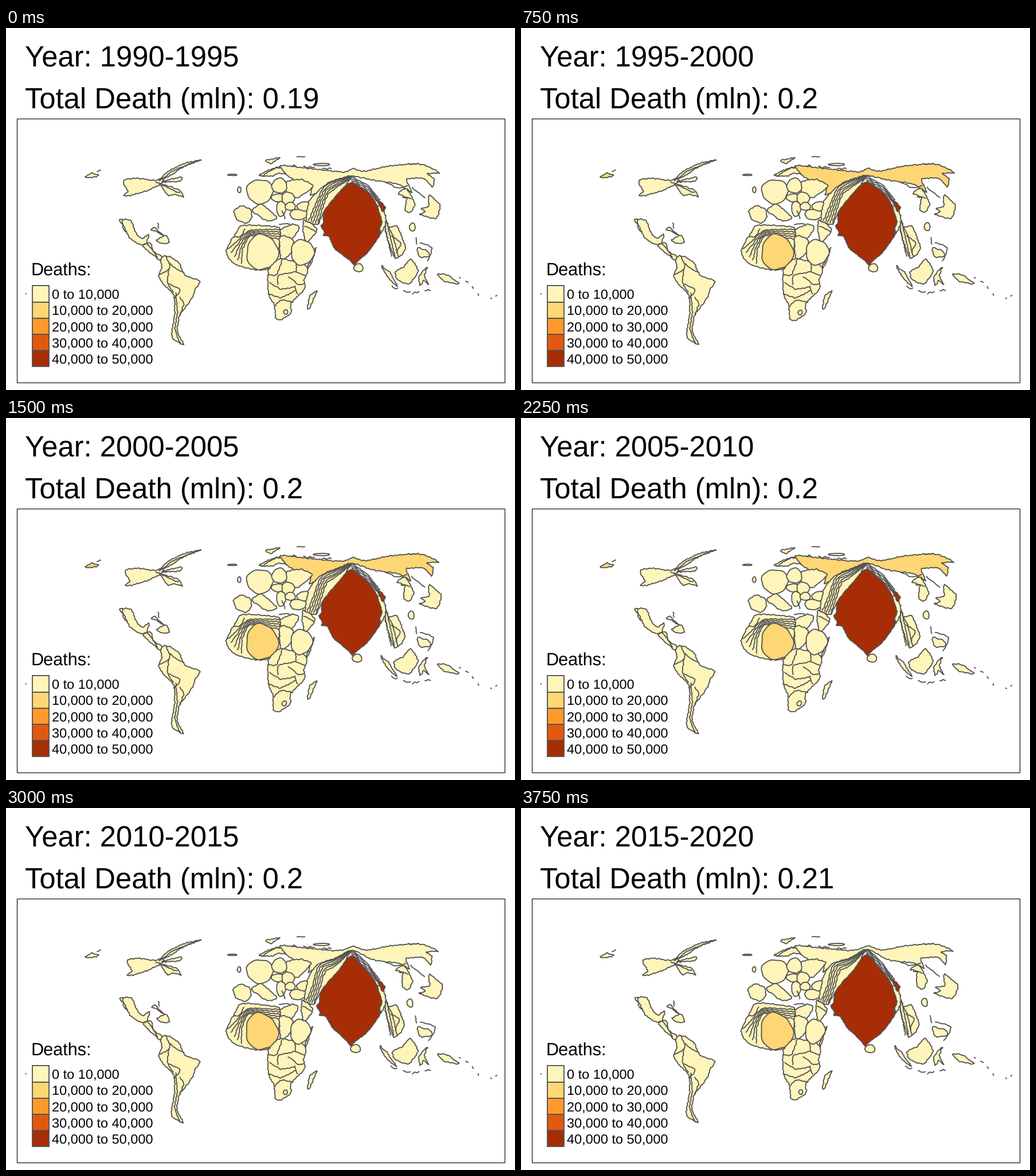
Recreate the animation shown at these times as a matplotlib script. Size 888 by 631 pixels, loop 4.5 s.

```python
import numpy as np
import matplotlib.pyplot as plt
from matplotlib.animation import FuncAnimation
from matplotlib.patches import Polygon, Rectangle

W, H, DPI = 888, 631, 100
PX = 72 / DPI
SCALE = ["#FFF5BA", "#FED674", "#FE9A2C", "#E1590F", "#A62D06"]
EDGE = "#535353"
LINE = 1.85 * PX
PACE = [0, 0.08, 0.4, 0.43, 0.85, 1]
SOUTH = [0, 0.4, 1, 1, 0.2, 0]

plt.rcParams["font.family"] = "Liberation Sans"
plt.rcParams["text.hinting"] = "none"
fig = plt.figure(figsize=(W / DPI, H / DPI), dpi=DPI, facecolor="white")
ax = fig.add_axes([0, 0, 1, 1])
ax.set_xlim(0, W)
ax.set_ylim(H, 0)
ax.axis("off")
shapes = []


def pairs(nums):
    return np.array(nums, float).reshape(-1, 2)


def coast(pts, closed, rough):
    """Run a soft curve through the points and ruffle it."""
    if closed:
        ring = np.vstack([pts[-1:], pts, pts[:2]])
    else:
        ring = np.vstack([pts[:1], pts, pts[-1:]])
    out = []
    for a, b, c, d in zip(ring, ring[1:], ring[2:], ring[3:]):
        n = max(2, int(np.hypot(*(c - b)) / 2.5))
        t = np.linspace(0, 1, n, endpoint=False)[:, None]
        m, k = 0.3 * (c - a), 0.3 * (d - b)
        out.append(b + m * t + (3 * (c - b) - 2 * m - k) * t ** 2
                   + (2 * (b - c) + m + k) * t ** 3)
    if not closed:
        out.append(pts[-1:])
    p = np.vstack(out)
    x, y = p.T
    return p + rough * np.column_stack([
        np.sin(0.8 * y + 0.3 * x) + 0.5 * np.sin(0.37 * y),
        np.sin(0.75 * x - 0.4 * y) + 0.5 * np.sin(0.41 * x)])


def add(pts, tint, **style):
    patch = Polygon(pts, ec=EDGE, lw=LINE, joinstyle="round", **style)
    ax.add_patch(patch)
    shapes.append((patch, pts, tint))


def area(*nums, tint=(0,) * 6, rough=0.7):
    add(coast(pairs(nums), True, rough), tint, fc=SCALE[0])


def blob(x, y, rx, ry, tint=(0,) * 6):
    a = np.linspace(0, 2 * np.pi, 40, endpoint=False)
    r = 1 + 0.05 * np.sin(3 * a + x) + 0.025 * np.sin(7 * a + y)
    add(np.column_stack([x + rx * r * np.cos(a), y + ry * r * np.sin(a)]),
        tint, fc=SCALE[0])


def strand(*nums):
    add(coast(pairs(nums), False, 0.6), None, closed=False, fill=False,
        capstyle="round")


def fan(first, last, n):
    for t in np.linspace(0, 1, n):
        strand(*(pairs(first) * (1 - t) + pairs(last) * t).ravel())


def dashes(n, *nums):
    path = coast(pairs(nums), False, 0.6)
    for part in np.array_split(path, n):
        strand(*part[:max(2, int(len(part) * 0.75))].ravel())


# North and Central America
area(205, 271, 209, 264, 230, 262, 260, 266, 268, 262, 277, 266, 268, 273,
     246, 284, 216, 292, 205, 292, 213, 285)
area(268, 265, 284, 249, 312, 236, 341, 230, 312, 241, 288, 256)
strand(268, 266, 292, 249, 325, 235)
area(272, 268, 290, 263, 307, 260, 304, 267, 288, 268)
area(268, 272, 290, 278, 305, 284, 309, 294, 293, 290, 284, 292)
strand(262, 268, 284, 279, 303, 288)
area(198, 334, 217, 335, 224, 351, 230, 362, 238, 367, 249, 360, 244, 376,
     232, 377, 215, 365, 206, 346)
strand(203, 334, 204, 348, 211, 357)
area(239, 380, 252, 374, 257, 389, 274, 400, 268, 404, 252, 392)
strand(246, 376, 256, 388, 264, 400)
area(253, 353, 260, 348, 274, 362, 262, 354)
strand(265, 340, 266, 349)
area(263, 370, 279, 361, 285, 373, 273, 376)

# South America
area(270, 404, 277, 397, 291, 401, 303, 412, 312, 431, 338, 441, 329, 458,
     326, 468, 314, 486, 303, 500, 299, 530, 310, 552, 294, 544, 289, 533,
     294, 500, 293, 466, 275, 447, 266, 430, 272, 420)
strand(279, 398, 286, 418, 268, 430)
strand(286, 411, 299, 421, 310, 426)
strand(284, 420, 282, 444, 292, 461)
strand(283, 446, 304, 456, 295, 470)
strand(303, 469, 310, 480, 304, 500)
strand(296, 462, 299, 495, 295, 525, 304, 550)

# Atlantic and the far north
blob(395, 256, 8, 1.2)
blob(407, 282, 3, 5)
area(453, 231, 478, 226, 462, 236)
strand(508, 224, 521, 225)
blob(551, 238, 14, 2)
area(442, 257, 465, 245, 490, 241, 499, 256, 477, 253, 464, 258)
strand(445, 259, 472, 244, 500, 246)

# Russia
RUSSIA = [0, 1, 1, 1, 0, 0]
area(478, 240, 521, 244, 590, 251, 604, 245, 625, 250, 665, 241, 722, 237,
     756, 252, 735, 254, 747, 263, 744, 277, 728, 262, 699, 264, 708, 286,
     683, 272, 640, 265, 600, 258, 562, 270, 551, 283, 530, 292, 533, 281,
     496, 261, tint=RUSSIA)
dashes(3, 497, 240, 570, 246)
area(138, 259, 150, 253, 161, 257, 147, 261, tint=RUSSIA)
strand(159, 250, 165, 248)
strand(703, 237, 719, 237)

# Europe
area(490, 268, 515, 264, 536, 276, 508, 296, 489, 284)
blob(443, 285, 23, 21)
blob(477, 275, 13, 13)
blob(475, 296, 12, 7)
blob(492, 297, 11, 11)
blob(480, 315, 8, 13)
blob(496, 311, 9, 7)
strand(482, 318, 487, 333)
area(398, 318, 411, 310, 427, 317, 428, 333, 418, 340, 402, 333)
area(434, 313, 446, 307, 473, 331, 455, 336, 430, 319)
blob(511, 325, 16, 9)
blob(520, 311, 12, 8)
strand(476, 342, 495, 341)

# Central and western Asia
area(601, 258, 562, 270, 530, 300, 524, 335, 544, 342, 555, 320, 592, 275)
fan([601, 257, 555, 277, 528, 336], [602, 262, 562, 290, 544, 341], 5)
area(521, 335, 543, 351, 524, 374, 518, 350)
strand(521, 345, 530, 349, 541, 355)

# Eastern and southern Asia
fan([602, 259, 632, 275, 652, 300], [604, 268, 632, 285, 647, 302], 4)
area(655, 312, 667, 347, 682, 345, 697, 384, 680, 402, 667, 372)
fan([662, 325, 662, 352, 673, 398], [667, 347, 676, 365, 684, 398], 3)
strand(672, 362, 689, 375, 681, 391)
area(649, 311, 656, 308, 663, 336, 654, 358)
area(648, 299, 662, 313, 657, 320, tint=[4] * 6)
area(604, 270, 633, 288, 646, 307, 656, 338, 651, 350, 652, 361, 632, 390,
     613, 407, 607, 413, 601, 406, 573, 384, 564, 364, 553, 361, 556, 356,
     549, 345, 554, 340, 554, 321, 572, 297, 592, 275, tint=[4] * 6,
     rough=0.35)
blob(615, 418, 8, 7)
area(684, 289, 698, 280, 713, 306, 705, 322, 696, 316, 699, 296)
strand(692, 295, 707, 297)
strand(662, 268, 683, 279, 700, 275)
strand(708, 278, 731, 296)
area(738, 291, 757, 309, 750, 332, 722, 325, 732, 321, 725, 315, 737, 311)
blob(709, 347, 5, 7)

# Islands of the south-east
area(655, 415, 669, 426, 683, 451, 665, 433)
area(679, 425, 694, 416, 706, 403, 719, 424, 703, 446, 683, 439)
area(721, 432, 735, 417, 730, 432, 737, 447, 729, 440, 722, 449)
area(753, 429, 771, 431, 790, 446, 764, 441)
dashes(4, 674, 451, 708, 462, 743, 455)
dashes(3, 790, 436, 806, 444, 818, 455)
strand(823, 464, 825, 467)
dashes(2, 845, 471, 855, 466)
area(718, 383, 735, 389, 739, 398, 721, 399)
strand(722, 374, 743, 383, 736, 406)
strand(716, 365, 716, 377)
strand(35, 463, 35, 464)

# Northern and western Africa
area(385, 385, 402, 356, 414, 344, 474, 347, 478, 364, 470, 414, 440, 422,
     402, 413, 387, 399)
fan([387, 385, 403, 372, 425, 353, 478, 351],
    [411, 411, 413, 385, 428, 362, 477, 368], 5)
strand(397, 363, 409, 364, 417, 350)
blob(447, 391, 27.5, 30.5, tint=[0, 1, 1, 1, 1, 1])
area(480, 351, 500, 342, 512, 348, 498, 368, 480, 362)

# Eastern and southern Africa
area(478, 363, 501, 369, 498, 391, 480, 404)
area(458, 422, 479, 402, 526, 416, 520, 440, 521, 455, 497, 480, 498, 495,
     482, 508, 471, 506, 468, 482, 458, 463)
strand(458, 430, 472, 430, 482, 404)
strand(460, 444, 480, 455, 504, 451)
strand(474, 447, 476, 431, 506, 424, 505, 406)
strand(458, 463, 480, 470, 504, 458)
strand(470, 484, 480, 474, 501, 478)
strand(493, 433, 510, 447, 521, 446)
strand(506, 425, 522, 432)
strand(504, 450, 508, 463)
blob(488, 495, 3.5, 4)
area(541, 382, 533, 410, 525, 418, 537, 395)
blob(517, 391, 20, 22)
area(526, 487, 530, 468, 542, 458, 529, 490)

# Pulls on the map: centre, shift, reach
PULLS = [
    (604, 268, 0, -14, 22), (552, 348, -9, 0, 34), (608, 413, -7, 2, 30),
    (548, 286, -6, -9, 24), (430, 370, -3, -4, 28), (532, 402, -7, -4, 28),
    (208, 278, 9, 0, 26), (305, 290, -6, -4, 18), (235, 350, 2, -7, 42),
    (305, 540, -1, -4, 40), (697, 300, -8, -11, 26), (755, 312, 5, 0, 22),
    (690, 376, -3, -8, 24), (709, 346, -5, -8, 15), (743, 388, 7, -2, 18),
    (675, 425, -6, 0, 25), (748, 266, -5, -6, 20), (412, 322, -2, -4, 30),
]
SWELL = (474, 500, -4, 4, 22)


def shift(pts, pull):
    x, y, dx, dy, reach = pull
    d2 = ((pts - (x, y)) ** 2).sum(axis=1) / reach ** 2
    return np.exp(-d2)[:, None] * (dx, dy)


moves = [(sum(shift(pts, p) for p in PULLS), shift(pts, SWELL))
         for _, pts, _ in shapes]


def label(x, y, size, text=""):
    return ax.text(x, y, text, fontsize=size * PX, color="black",
                   va="baseline", ha="left")


# Panel, legend and headings
ax.add_patch(Rectangle((18.5, 157.5), 851, 460, fill=False, ec="black",
                       lw=1.1 * PX))
label(43.5, 431, 30.6, "Deaths:")
for i, colour in enumerate(SCALE):
    top = 449.3 + 28.2 * i
    ax.add_patch(Rectangle((46, top), 28.5, 28.2, fc=colour, ec=EDGE,
                           lw=LINE))
    low = "%d,000" % (10 * i) if i else "0"
    label(80.3, top + 22.9, 23.5, "%s to %d,000" % (low, 10 * i + 10))
year = label(33.3, 67.5, 50.8)
total = label(33.3, 140, 50.8)


def draw(i):
    start = 1990 + 5 * i
    year.set_text("Year: %d-%d" % (start, start + 5))
    total.set_text("Total Death (mln): " + {0: "0.19", 5: "0.21"}.get(i, "0.2"))
    for (patch, pts, tint), (drift, swell) in zip(shapes, moves):
        patch.set_xy(pts + PACE[i] * drift + SOUTH[i] * swell)
        if tint is not None:
            patch.set_facecolor(SCALE[tint[i]])
    return []


anim = FuncAnimation(fig, draw, frames=6, interval=750, repeat=True,
                     repeat_delay=0)
plt.show()
```
